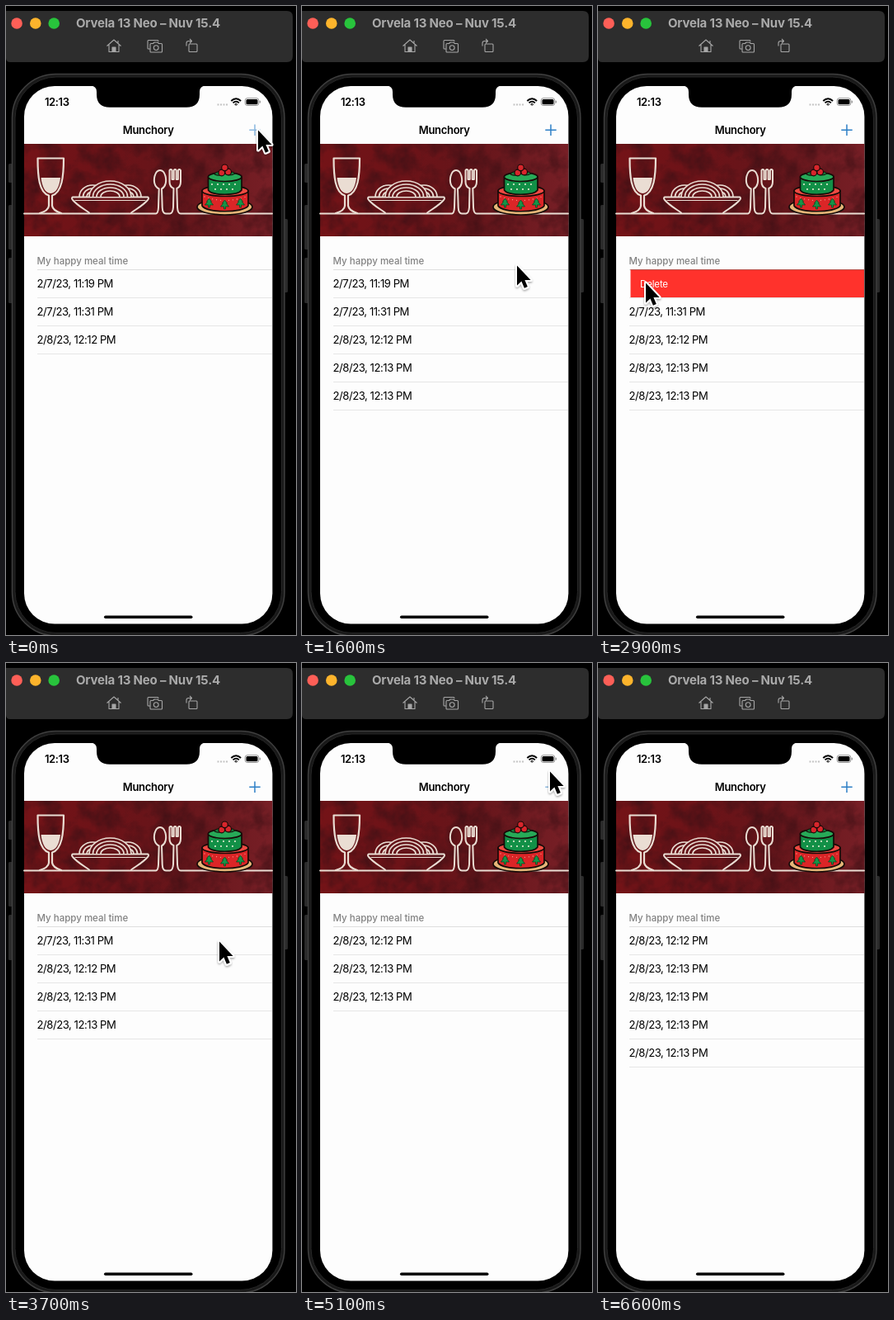
Recreate the animation shown at these times as an HTML page. Size 352x762 px, loop 7 s.

```html
<!DOCTYPE html>
<html lang="en">
<head>
<meta charset="utf-8">
<title>Meal list</title>
<style>
  html, body { margin: 0; height: 100%; overflow: hidden; background: #000; }
  svg { display: block; }
  text { font-family: Inter, Roboto, sans-serif; }
  .row { font-size: 13.1px; letter-spacing: -.46px; }
  .cream { fill: none; stroke: #eaddd3; stroke-width: 2; stroke-linejoin: round; stroke-linecap: round; }
  .icon { fill: none; stroke: #a6a6a6; stroke-width: 1.1; stroke-linejoin: round; }
  .ink { stroke: #160b08; stroke-width: 1.700; stroke-linejoin: round; }
</style>
</head>
<body>
<svg width="352" height="762" viewBox="0 0 352 762">
  <defs>
    <linearGradient id="wall">
      <stop offset="0" stop-color="#741317"/>
      <stop offset=".35" stop-color="#6c1318"/>
      <stop offset=".62" stop-color="#66151a"/>
      <stop offset="1" stop-color="#771f26"/>
    </linearGradient>
    <filter id="grain" x="0" y="0" width="1" height="1" color-interpolation-filters="sRGB">
      <feTurbulence type="fractalNoise" baseFrequency=".045" numOctaves="5" seed="4"/>
      <feColorMatrix values="0 0 0 0 .24  0 0 0 0 .06  0 0 0 0 .08  1.6 0 0 0 -.55"/>
    </filter>
    <filter id="shade" x="-.5" y="-.5" width="2" height="2">
      <feDropShadow dx="0" dy="1.5" stdDeviation="1.3" flood-opacity=".35"/>
    </filter>
    <path id="tree" d="M0-6L3-2H2L5 2H1V5H-1V2H-5L-2-2H-3Z" fill="#159447" stroke="#0b3d1c" stroke-width=".7"/>
    <path id="side" d="M89 231A16 14 0 0 1 121 231M93.500 231A11.500 10 0 0 1 116.500 231M98 231A7 6 0 0 1 112 231"/>
  </defs>

  <!-- window bar -->
  <path d="M0 6H341Q348 6 348 13V61Q348 68 341 68H5Q0 68 0 63Z" fill="#2d2d2d"/>
  <circle cx="13.100" cy="21" r="6.800" fill="#fe5f57"/>
  <circle cx="35.800" cy="21" r="6.800" fill="#fdb42c"/>
  <circle cx="58.200" cy="21" r="6.800" fill="#28c33c"/>
  <text x="85" y="26" font-size="15" font-weight="700" letter-spacing="-.2" fill="#aaa">Orvela 13 Neo – Nuv 15.4</text>
  <g class="icon">
    <path d="M122.500 48.500L131 41L139.500 48.500M125 47V55.500H137V47M136 45V42"/>
    <path d="M129 50H133V55.500H129Z" fill="#a6a6a6"/>
    <path d="M174.500 52H173Q172 52 172 51V42.500Q172 41.500 173 41.500H184Q185 41.500 185 43M176 45.500H178.500L180 44H184L185.500 45.500H188.500Q189.500 45.500 189.500 46.500V55Q189.500 56 188.500 56H176Q175 56 175 55V46.500Q175 45.500 176 45.500Z"/>
    <circle cx="182.200" cy="50.600" r="2.900"/>
    <path d="M223 46H231Q232 46 232 47V54.500Q232 55.500 231 55.500H223Q222 55.500 222 54.500V47Q222 46 223 46ZM219 48.500V45Q219 42.500 221.500 42.500H225M223 40L225.500 42.500L223 45"/>
  </g>

  <!-- handset -->
  <g fill="#2b2b2b">
    <rect x="3" y="191" width="5" height="23" rx="1.500"/>
    <rect x="3" y="241" width="5" height="54" rx="1.500"/>
    <rect x="3" y="305" width="5" height="55" rx="1.500"/>
    <rect x="337" y="258" width="5" height="89" rx="1.500"/>
  </g>
  <rect x="7.500" y="82.500" width="330.500" height="680.500" rx="53" fill="#191919" stroke="#3f3f3f" stroke-width="1.500"/>
  <rect x="11" y="86" width="323.500" height="673.500" rx="50" fill="#000" stroke="#262626"/>
  <rect x="22" y="97" width="301.400" height="651.500" rx="37" fill="#fdfdfd"/>
  <path d="M103 96.500Q110 97 110 104V107Q110 122.700 126 122.700H219Q235 122.700 235 107V104Q235 97 242 96.500Z"/>
  <rect x="119" y="738.500" width="107.500" height="3.600" rx="1.800"/>

  <!-- status and navigation -->
  <text x="47" y="120.500" font-size="13" font-weight="600" letter-spacing="-.4">12:13</text>
  <path d="M256.500 119.500H269" stroke="#c4c4c4" stroke-width="2" stroke-dasharray="2 1.500"/>
  <g fill="none" stroke="#000" stroke-width="1.900">
    <path d="M273.300 115Q279.200 109.300 285.100 115M275.500 117.400Q279.200 113.900 282.900 117.400"/>
    <path d="M279.200 120.500L277.700 119Q279.200 117.700 280.700 119Z" stroke-width="1"/>
  </g>
  <rect x="290.200" y="111.700" width="16.600" height="8.800" rx="2.700" fill="none" stroke="#8b8b8b" stroke-width=".9"/>
  <rect x="291.500" y="113" width="14" height="6.200" rx="1.500"/>
  <path d="M308.300 114.700V117.500" stroke="#8b8b8b" stroke-width="1.200"/>
  <text x="172.700" y="155" font-size="13" font-weight="600" letter-spacing="-.3" text-anchor="middle">Munchory</text>
  <path id="plus" d="M295.300 150.300H308.700M302 143.600V157" stroke="#2d7fc6" stroke-width="1.500"/>

  <!-- banner -->
  <rect x="22" y="167" width="301.400" height="112" fill="url(#wall)"/>
  <rect x="22" y="167" width="301.400" height="112" filter="url(#grain)"/>
  <g class="cream">
    <path d="M22 251.500H182Q184.700 251 185 244L185.700 221.500C180 219 179 212 180.500 206C183 196.500 191 196.500 193.500 206C195 212 194 219 189 221.500L189.700 244Q190 251.500 194 251.500H199Q202.500 251 203 244L203.500 221C199.500 219.500 198.500 216 198.500 213V199Q200 197 201.500 199V210H203.700V199Q205.200 197 206.700 199V210H208.900V199Q210.400 197 212 199V213C212 216 211 219.500 207.300 221L208 244Q208.500 251.500 212 251.500H323"/>
    <path d="M38.500 184.500H70C70 206 68 226 56 229.500V242Q57 248 67 251M38.500 184.500C38.500 206 40 226 52 229.500V242Q51.500 248 41 251" stroke-width="2.200"/>
    <path d="M81 231.500H172Q174 232.500 172 235C166 242 158 246 152 250.500M81 231.500Q79 232.500 81 235C87 242 95 246 101 250.500"/>
    <path d="M84 235.500H169" stroke-width="1"/>
    <g stroke-width="1.700">
      <use href="#side"/>
      <use href="#side" transform="matrix(-1 0 0 1 253 0)"/>
      <path d="M101 231A25.500 19 0 0 1 152 231" fill="#65151a"/>
      <path d="M105.500 231A21 15 0 0 1 147.500 231M110 231A16.500 11 0 0 1 143 231M115 231A11.500 7 0 0 1 138 231"/>
    </g>
  </g>
  <path d="M42.500 208H66C65 218 61.500 226.500 54.200 227C47 226.500 43.500 218 42.500 208Z" fill="#eaddd3"/>
  <g class="ink">
    <ellipse cx="265.500" cy="243.500" rx="33.500" ry="9.500" fill="#e5b678"/>
    <path d="M238 224V242C243 251 288 251 294 242V224Z" fill="#db2527"/>
    <ellipse cx="266" cy="224" rx="28" ry="6.500" fill="#ee4a42"/>
    <path d="M245.500 207V223C250 230 281 230 286 223V207Z" fill="#129047"/>
    <ellipse cx="265.700" cy="207" rx="20.300" ry="5.500" fill="#27aa58"/>
    <path d="M265 203Q256 198 253 204Q259 207 265 203Q273 198 278 203Q272 207 265 203Z" fill="#157b3a" stroke-width="1"/>
    <g fill="#d8262c" stroke-width="1.200">
      <circle cx="261.800" cy="202" r="3.800"/><circle cx="269.700" cy="201" r="3.800"/><circle cx="265.500" cy="195.800" r="3.800"/>
    </g>
  </g>
  <path d="M250 216H284M254 222H282" stroke="#f3f4dc" stroke-width="2" stroke-linecap="round" stroke-dasharray="0 7"/>
  <path d="M241 231Q266 240 291 231" fill="none" stroke="#f7a08d" stroke-width="1.300" stroke-linecap="round" stroke-dasharray="0 5"/>
  <use href="#tree" x="246.500" y="239"/><use href="#tree" x="265.500" y="241"/><use href="#tree" x="284.500" y="239"/>

  <!-- list -->
  <text x="37.500" y="312.500" font-size="11.500" font-weight="500" fill="#818181">My happy meal time</text>
  <path d="M38 319.500H323" stroke="#dedede"/>
  <g id="list"></g>

  <path id="cursor" d="M1 2.500V26.500L6.400 21.500L9.900 29.800L13.800 28.100L10.400 20H17.600Z" stroke="#fff" stroke-width="4" stroke-linejoin="round" paint-order="stroke" filter="url(#shade)"/>
</svg>
<script>
const LOOP = 7000, STEP = 100, ROW = 34, TOP = 319, WIDTH = 301, SWIPE = 283.5;
const $ = id => document.getElementById(id);
const clamp = v => Math.min(1, Math.max(0, v));
const ramp = (t, start, length) => clamp((t - start) / length);
const smooth = p => p * p * (3 - 2 * p);

// born: tap that adds the row; gone: moment its removal starts
const rows = [
  { label: '2/7/23, 11:19 PM', gone: 2900 },
  { label: '2/7/23, 11:31 PM', gone: 4300 },
  { label: '2/8/23, 12:12 PM' },
  { label: '2/8/23, 12:13 PM', born: 200 },
  { label: '2/8/23, 12:13 PM', born: 600 },
  { label: '2/8/23, 12:13 PM', born: 5300 },
  { label: '2/8/23, 12:13 PM', born: 5800 },
];
const taps = [0, 500, 5100, 5700];

// time, x, y of the pointer tip
const path = [
  [0, 305, 148], [800, 305, 148], [1600, 260, 312], [2000, 264, 333], [2400, 264, 333],
  [2800, 57, 333], [3100, 57, 333], [3600, 258, 335], [3800, 258, 335], [4300, 17, 331],
  [4500, 17, 331], [5100, 300, 129], [5300, 304, 148], [6400, 304, 150], [6500, 304, 171],
];

for (const row of rows) {
  $('list').insertAdjacentHTML('beforeend', `<svg x="22" width="${WIDTH}">
    <text class="row" x="15.500" y="22.300">${row.label}</text>
    <g><rect width="${WIDTH}" height="${ROW}" fill="#ff322c"/>
    <path d="M0 .5H${WIDTH}" stroke="#b8504a"/>
    <text x="11.500" y="21.500" font-size="11.600" letter-spacing="-.2" fill="#fff">Delete</text></g>
    <path d="M16 0H${WIDTH}" stroke="#e6e6e6"/></svg>`);
  row.box = $('list').lastElementChild;
  [row.text, row.action, row.line] = row.box.children;
}

function drawRows(t) {
  let y = TOP;
  for (const { born = -LOOP, gone = 2 * LOOP, box, text, action, line } of rows) {
    const shown = smooth(ramp(t, born, 300));
    const height = ROW * (1 - ramp(t, gone, 215));
    const shift = SWIPE * smooth(ramp(t, gone - 500, 400));
    const visible = shown > 0 && height > 0;
    box.style.display = visible ? '' : 'none';
    if (!visible) continue;
    box.setAttribute('y', y);
    box.setAttribute('height', height + 1);
    box.setAttribute('opacity', shown);
    text.setAttribute('transform', `translate(${-shift})`);
    action.setAttribute('transform', `translate(${WIDTH - shift})`);
    line.setAttribute('transform', `translate(0 ${height + .5})`);
    y += height;
  }
}

function drawCursor(t) {
  const next = path.findIndex(p => p[0] > t);
  $('cursor').style.display = t >= 6600 ? 'none' : '';
  const [t0, x0, y0] = path.at(next < 0 ? -1 : next - 1);
  const [t1, x1, y1] = path.at(next);
  const p = t1 > t0 ? smooth(ramp(t, t0, t1 - t0)) : 0;
  $('cursor').setAttribute('transform', `translate(${x0 + (x1 - x0) * p} ${y0 + (y1 - y0) * p})`);
}

function draw() {
  const t = Math.floor(performance.now() % LOOP / STEP) * STEP;
  drawRows(t);
  drawCursor(t);
  $('plus').setAttribute('opacity', taps.some(tap => t >= tap && t < tap + 200) ? .55 : 1);
  requestAnimationFrame(draw);
}
draw();
</script>
</body>
</html>
```
